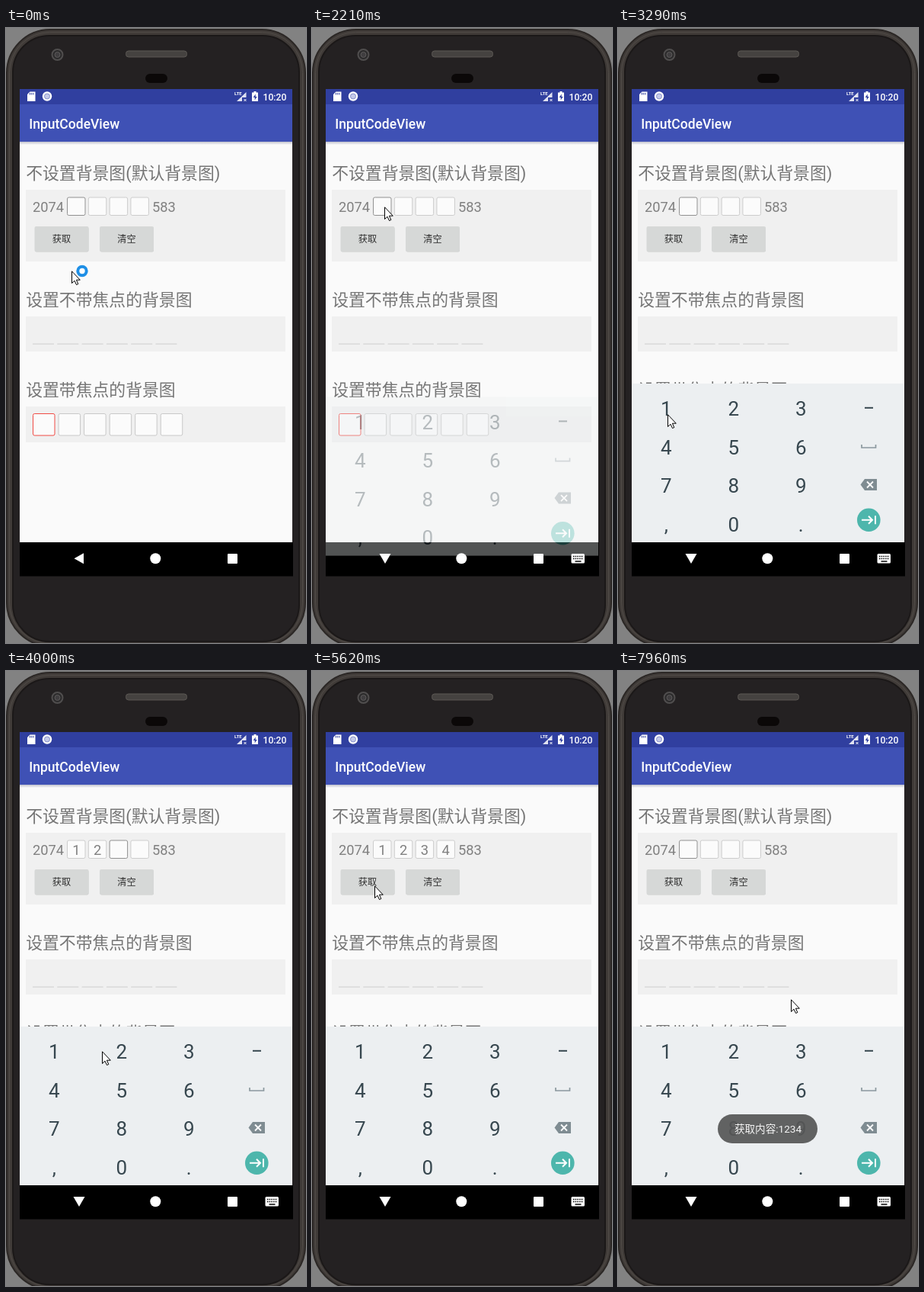
Recreate the animation shown at these times as an HTML page. Size 394 by 806 pixels, loop 8 s.

```html
<!DOCTYPE html>
<html lang="zh-CN">
<head>
<meta charset="utf-8">
<title>InputCodeView</title>
<style>
  html, body { margin: 0; width: 100%; height: 100%; overflow: hidden; background: #828282; }
  svg { display: block; width: 100vw; height: 100vh; }
  text { font-family: Roboto, "Noto Sans CJK SC", "Noto Sans CJK", sans-serif; }
  .head { font-size: 21.83px; fill: #757575; }
  .num { font-size: 18.3px; fill: #808080; }
  .mid { text-anchor: middle; }
  .btn { font-size: 12.2px; fill: #303030; }
  .key { font-size: 26px; fill: #37474f; }
</style>
</head>
<body>
<svg viewBox="0 0 394 806">
  <defs>
    <clipPath id="screenClip"><rect id="contentClip" x="18" y="80" width="358" height="594"/></clipPath>
    <clipPath id="btnClip1"><rect x="37.5" y="260" width="71" height="33" rx="2"/></clipPath>
    <clipPath id="btnClip2"><rect x="123" y="260" width="71" height="33" rx="2"/></clipPath>
    <linearGradient id="shade" x2="0" y2="1">
      <stop offset="0" stop-color="#c0c1cc"/><stop offset="1" stop-color="#fafafa"/>
    </linearGradient>
  </defs>

  <!-- phone body -->
  <rect width="394" height="806" fill="#828282"/>
  <rect x="1" y="2" width="392" height="808" rx="57" fill="#403b38" stroke="#2b2725" stroke-width="2"/>
  <rect x="4.5" y="5.500" width="385" height="801" rx="53" fill="none" stroke="#504b47"/>
  <rect x="9" y="10" width="376" height="794" rx="48" fill="#242122" stroke="#1b1818" stroke-width="2"/>
  <circle cx="67.500" cy="35" r="7" fill="#2b2a2b" stroke="#504e4e" stroke-width="2"/>
  <circle cx="67.500" cy="35" r="3.500" fill="#403e40" stroke="#5d5b5b"/>
  <rect x="157.500" y="30" width="80" height="8" rx="3.500" fill="#454240" stroke="#5c5854"/>
  <rect x="183" y="60" width="29" height="12" rx="6" fill="#0b0808"/>

  <!-- app content -->
  <rect x="18" y="80" width="358" height="594" fill="#fafafa"/>
  <g clip-path="url(#screenClip)">
    <text class="head" x="26.200" y="198">不设置背景图(默认背景图)</text>
    <text class="head" x="26.200" y="364">设置不带焦点的背景图</text>
    <text class="head" x="26.200" y="482">设置带焦点的背景图</text>
    <g fill="#f0f0f0">
      <rect x="26" y="212" width="341" height="94"/>
      <rect x="26" y="378" width="341" height="46"/>
      <rect x="26" y="496" width="341" height="47"/>
    </g>
    <text class="num" x="35" y="241">2074</text>
    <text class="num" x="192" y="241">583</text>
    <g id="boxes"></g>
    <g fill="#c9cbca">
      <rect x="38" y="261" width="70.500" height="32.500" rx="2"/>
      <rect x="123.500" y="261" width="70.500" height="32.500" rx="2"/>
    </g>
    <g fill="#d6d8d7">
      <rect x="37.500" y="260" width="71" height="33" rx="2"/>
      <rect x="123" y="260" width="71" height="33" rx="2"/>
    </g>
    <g fill="#9a9c9b">
      <circle id="ripple1" cx="82" cy="281" clip-path="url(#btnClip1)"/>
      <circle id="ripple2" cx="156" cy="271" clip-path="url(#btnClip2)"/>
    </g>
    <text class="btn mid" x="73" y="280.500">获取</text>
    <text class="btn mid" x="158.500" y="280.500">清空</text>
    <g id="lines" fill="#dcdcdc"></g>
    <g id="cells" fill="#fbfbfb"></g>
  </g>
  <rect x="18" y="149" width="358" height="4" fill="url(#shade)"/>
  <rect x="18" y="80" width="358" height="20" fill="#303f9f"/>
  <rect x="18" y="100" width="358" height="49" fill="#3f51b5"/>
  <text x="30.300" y="131.500" font-size="17.500" font-weight="500" fill="#fff">InputCodeView</text>

  <!-- status bar -->
  <g fill="#fff">
    <path d="M31.500 83.500H38.500V96H28V87Z"/>
    <path d="M31.500 85v2.500M33.700 85v2.500M35.900 85v2.500" stroke="#303f9f"/>
    <circle cx="54" cy="89.500" r="6.200"/>
    <circle cx="54" cy="89.500" r="3.500" fill="#c5cae9" stroke="#8791cb"/>
    <text x="300" y="88" font-size="6" font-weight="700">LTE</text>
    <path d="M315.500 84V91H310V96H303Z" opacity=".85"/>
    <path d="M312.500 93l3 3m0-3l-3 3" stroke="#fff"/>
    <path d="M325.500 83h3v1.500h2.500v11.500h-8v-11.500h2.500z"/>
    <path d="M327.700 86.500l-3 4.500h2v3.500l3-4.500h-2z" fill="#303f9f"/>
    <text x="337.500" y="94.500" font-size="12.200" font-weight="500">10:20</text>
  </g>

  <!-- navigation bar -->
  <rect x="18" y="674" width="359" height="44.500" fill="#000"/>
  <g fill="#fff">
    <path id="back" d="M89.500 695.300L102 688.300V702.300Z"/>
    <g id="imeNav">
      <path d="M88.500 689H103.500L96 702Z"/>
      <rect x="340.500" y="689" width="17.500" height="12.500" rx="1.500"/>
      <path d="M343 692.500h13M343 695.500h13" stroke="#000" stroke-width="1.500" stroke-dasharray="1.500 1.200"/>
      <path d="M345.500 699h8" stroke="#000" stroke-width="1.500"/>
    </g>
    <circle cx="196.300" cy="695.300" r="7"/>
    <rect x="291" y="689" width="13" height="13" rx="1"/>
  </g>

  <g id="keyboard">
    <rect x="18" y="466" width="358" height="208" fill="#eceff1"/>
    <rect id="pressed" width="87" height="48" rx="2" fill="#cfd8dc"/>
    <g id="keys"></g>
    <path d="M324 497.800h11" stroke="#37474f" stroke-width="2"/>
    <path d="M320 546v4h18.500v-4" fill="none" stroke="#8b989e" stroke-width="1.700"/>
    <path d="M318.500 598.500l5.500-7.500h16v15h-16z" fill="#7f8c92"/>
    <path d="M327 594.500l8 8m0-8l-8 8" stroke="#fff" stroke-width="1.800"/>
    <circle cx="329.300" cy="644.700" r="15.300" fill="#4db6ac"/>
    <path d="M320 644.700h14m-5-5l5 5-5 5M338 639.200v11" fill="none" stroke="#fff" stroke-width="2"/>
  </g>

  <g id="toast">
    <rect x="131" y="581" width="131" height="38" rx="19" fill="rgb(86,86,86)" fill-opacity=".92"/>
    <text class="mid" x="197" y="605" font-size="13.600" fill="#f5f5f5">获取内容:1234</text>
  </g>

  <g id="cursor">
    <circle id="busy" cx="14" cy=".5" r="5.700" fill="#fff" stroke="#1e8fe6" stroke-width="4"/>
    <path d="M.5.800V16.500L4 13.200 6.500 18.500 8.800 17.500 6.400 12.200H11.300Z" fill="#fff" stroke="#000"/>
  </g>
</svg>
<script>
const LOOP = 8000;
const $ = id => document.getElementById(id);
const show = (el, on) => { el.style.display = on ? '' : 'none'; };
const clamp = v => Math.min(1, Math.max(0, v));

function add(parent, tag, attrs, text = '') {
  const el = document.createElementNS('http://www.w3.org/2000/svg', tag);
  for (const name in attrs) el.setAttribute(name, attrs[name]);
  el.textContent = text;
  parent.appendChild(el);
  return el;
}

const codeBoxes = [0, 1, 2, 3].map(i => {
  const x = 80.5 + 27.8 * i;
  return {
    frame: add($('boxes'), 'rect', { x, y: 222, width: 23.5, height: 23.5, rx: 2, fill: '#fbfbfb' }),
    digit: add($('boxes'), 'text', { class: 'num mid', x: x + 11.8, y: 241 }, i + 1)
  };
});
for (let i = 0; i < 6; i++) {
  add($('lines'), 'rect', { x: 35 + 32.3 * i, y: 413.3, width: 28, height: 1.7 });
  add($('cells'), 'rect', {
    x: 35.5 + 33.55 * i, y: 505.5, width: 28.5, height: 28.5, rx: 2, stroke: i ? '#c8c8c8' : '#f04a44'
  });
}
[...'123456789,0.'].forEach((label, i) => add($('keys'), 'text', {
  class: 'key mid', x: 63.4 + 88.4 * (i % 3), y: 508 + 50.5 * Math.floor(i / 3)
}, label));

// Pointer moves: start, end, steps, destination, optional curve control point.
const start = [86, 318];
const moves = [
  [60, 410, 7, [95, 234], [55, 280]],
  [2690, 2990, 6, [46, 501], [140, 330]],
  [3170, 3290, 3, [65, 506], [58, 474]],
  [3590, 3700, 3, [126, 498]],
  [4060, 4240, 4, [246, 503]],
  [4660, 4900, 5, [95, 540]],
  [5200, 5260, 2, [111, 526]],
  [5320, 5620, 6, [82, 281]],
  [6390, 6630, 5, [165, 322]],
  [6690, 6750, 2, [167, 303]],
  [6810, 7050, 4, [156, 271]],
  [7840, 7960, 3, [227, 430]]
];
const typed = [3530, 3940, 4540, 5080];
const presses = [[3470, 0, 0], [3880, 1, 0], [4480, 2, 0], [5020, 0, 1]];
const clearAt = 7540;

function pointerAt(t) {
  let from = start;
  for (const [begin, end, steps, to, via] of moves) {
    if (t < begin) return from;
    if (t < end) {
      const step = Math.floor((t - begin) / (end - begin) * (steps - 1)) + 1;
      const p = step / steps, q = 1 - p;
      return from.map((a, i) => {
        const mid = via ? via[i] : (a + to[i]) / 2;
        return q * q * a + 2 * q * p * mid + p * p * to[i];
      });
    }
    from = to;
  }
  return from;
}

function ripple(el, t, begin) {
  const age = Math.floor((t - begin) / 60) * 60;
  const on = t >= begin && age < 300;
  show(el, on);
  if (!on) return;
  el.setAttribute('r', 28 + age / 4);
  el.setAttribute('opacity', 0.5 * (1 - age / 300));
}

function draw(t) {
  const [x, y] = pointerAt(t);
  $('cursor').setAttribute('transform', `translate(${Math.round(x)} ${Math.round(y)})`);
  show($('busy'), t < 900);

  const open = t >= 2210;
  const rise = t >= 2450 ? 1 : t >= 2390 ? 0.8 : t >= 2270 ? 0.5 : 0.2;
  show($('keyboard'), open);
  show($('imeNav'), open);
  show($('back'), !open);
  $('keyboard').setAttribute('transform', `translate(0 ${22 * (1 - rise)})`);
  $('keyboard').setAttribute('opacity', Math.min(1, rise + 0.15));
  $('contentClip').setAttribute('height', t >= 2270 ? 386.5 : 594);

  const press = presses.find(([at]) => t >= at && t < at + 120);
  show($('pressed'), press);
  if (press) {
    $('pressed').setAttribute('x', 20 + 88.2 * press[1]);
    $('pressed').setAttribute('y', 474 + 50 * press[2]);
  }

  const count = t >= clearAt ? 0 : typed.filter(at => t >= at).length;
  codeBoxes.forEach(({ frame, digit }, i) => {
    frame.setAttribute('stroke', i === count ? '#909090' : '#cccccc');
    show(digit, i < count);
  });

  ripple($('ripple1'), t, 5990);
  ripple($('ripple2'), t, 7480);
  $('toast').setAttribute('opacity', clamp((Math.floor((t - 6050) / 60) + 1) / 5));
}

const origin = performance.now();
function tick() {
  draw((performance.now() - origin) % LOOP);
  requestAnimationFrame(tick);
}
tick();
</script>
</body>
</html>
```
